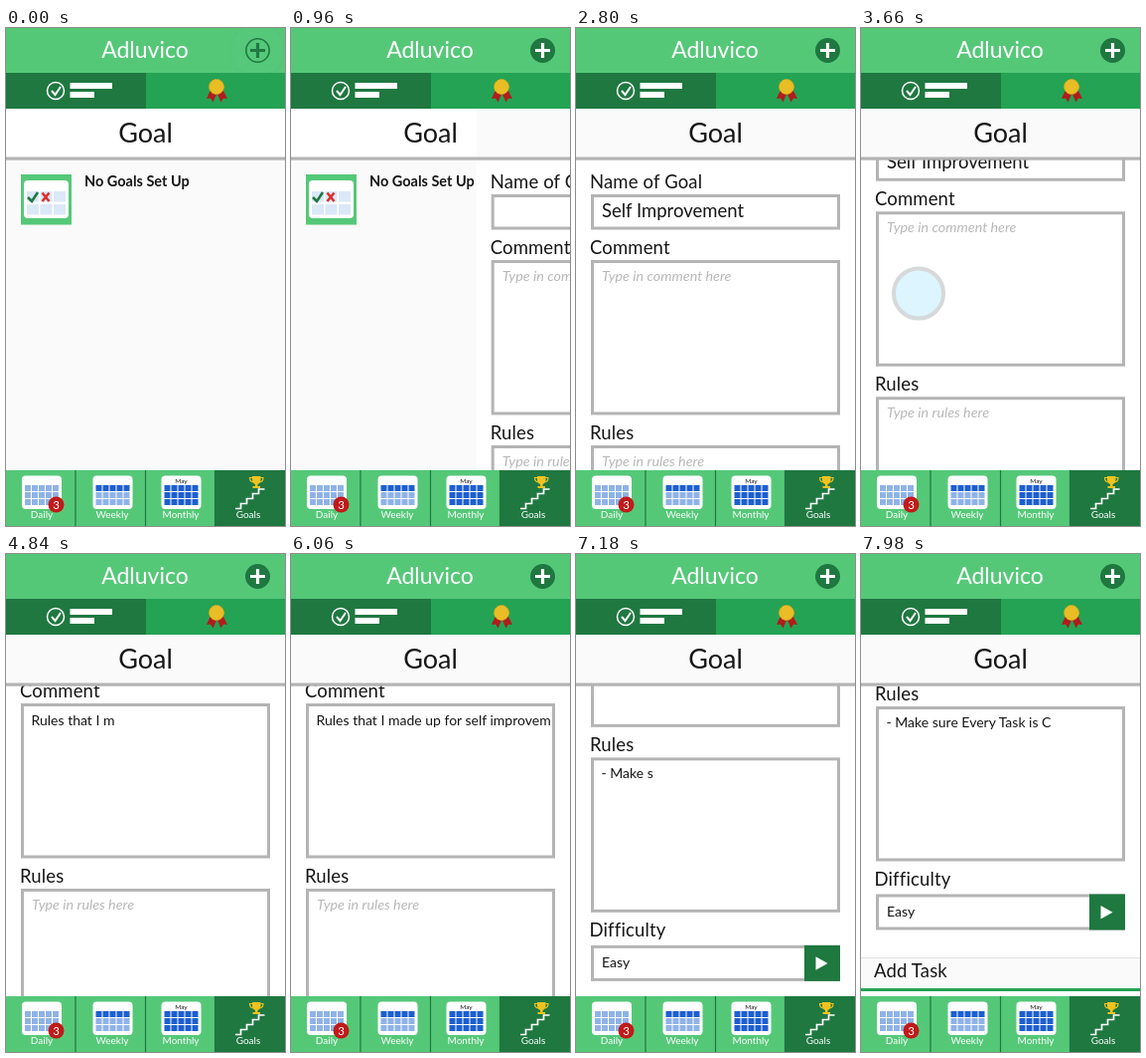
An HTML page that plays this animation: 281 by 500 pixels, repeating every 8000 ms.

```html
<!DOCTYPE html>
<html lang="en">
<head>
<meta charset="utf-8">
<title>Goal setup</title>
<style>
  html, body { margin: 0; width: 100%; height: 100%; overflow: hidden; background: #fafafa; }
  svg { display: block; width: 100vw; height: 100vh; }
  text { font-family: Lato, "Open Sans", sans-serif; fill: #161616; white-space: pre; }
  .label { font-size: 18.5px; letter-spacing: .15px; }
  .body { font-size: 14px; }
  .hint { font-size: 14.3px; font-style: italic; fill: #b8b8b8; }
  .tab { font-size: 10px; fill: #fff; text-anchor: middle; }
  .field { fill: #fff; stroke: #b4b4b4; stroke-width: 3; }
</style>
</head>
<body>
<svg viewBox="0 0 281 500" preserveAspectRatio="none">
  <rect width="281" height="500" fill="#fafafa"/>

  <g id="empty">
    <rect x="15" y="147" width="51" height="50.500" fill="#55c878"/>
    <rect x="18" y="153" width="45" height="38" rx="4" fill="#fff"/>
    <g id="goalCells"></g>
    <path d="M22 170l4 4 6-9" fill="none" stroke="#1f7840" stroke-width="2.600"/>
    <path d="M36.500 165.500l7 8.500m0-8.500l-7 8.500" stroke="#d8322e" stroke-width="2.600"/>
    <text x="79" y="159" font-size="14.500" font-weight="700">No Goals Set Up</text>
  </g>

  <g id="form">
    <rect y="81" width="281" height="720" fill="#fff"/>
    <text class="label" x="14" y="161">Name of Goal</text>
    <rect class="field" x="16.500" y="168.500" width="248" height="32.500"/>
    <text id="name" x="26" y="190" font-size="18.500"></text>

    <text class="label" x="14" y="226.500">Comment</text>
    <rect class="field" x="16.500" y="234.500" width="248" height="152.500"/>
    <text id="commentHint" class="hint" x="26" y="254">Type in comment here</text>
    <text id="comment1" class="body" x="25.500" y="254.500"></text>
    <text id="comment2" class="body" x="25.500" y="270.500"></text>

    <text class="label" x="14" y="412.500">Rules</text>
    <rect class="field" x="16.500" y="420.500" width="248" height="152.500"/>
    <text id="rulesHint" class="hint" x="26" y="440">Type in rules here</text>
    <text id="rules" class="body" x="25.500" y="439.500"></text>

    <text class="label" x="13.500" y="598.500">Difficulty</text>
    <rect class="field" x="16.500" y="609" width="248" height="33"/>
    <text class="body" x="26" y="629.500">Easy</text>
    <rect x="230" y="607.500" width="36" height="36" fill="#1f7840"/>
    <path d="M241.500 619v13.500l12-6.750z" fill="#fff"/>

    <rect y="671.500" width="281" height="31" fill="#fafafa"/>
    <rect y="671" width="281" height="1" fill="#e4e4e4"/>
    <text class="label" x="13" y="690.500">Add Task</text>
    <rect y="702" width="281" height="3" fill="#24a354"/>
  </g>

  <rect y="81" width="281" height="50" fill="#fff"/>
  <rect id="headTint" y="81" width="281" height="50" fill="#fafafa"/>
  <rect y="129.500" width="281" height="3.200" fill="#b4b4b4"/>
  <text x="140.500" y="114.500" font-size="27" text-anchor="middle">Goal</text>

  <rect width="281" height="45" fill="#55c878"/>
  <text x="140" y="30" font-size="23" text-anchor="middle" style="fill:#fff">Adluvico</text>
  <circle id="plusDisc" cx="253.500" cy="22.500" r="11.700" stroke="#1f7840" stroke-width="1.600"/>
  <path id="plus" d="M246 22.500h15M253.500 15v15" stroke-width="3.200"/>

  <rect y="45" width="141" height="36" fill="#1f7840"/>
  <rect x="141" y="45" width="140" height="36" fill="#24a354"/>
  <g fill="none" stroke="#fff">
    <circle cx="50" cy="63" r="8.500" stroke-width="1.500"/>
    <path d="M46 63l3.500 4 5.500-8" stroke-width="2"/>
  </g>
  <path d="M64.500 55h42.500v6h-42.500zM64.500 64h24.500v6h-24.500z" fill="#fff"/>
  <path d="M206 62l-4 9 4-.5 2.500 4 4-9 4 9 2.500-4 4 .5-4.500-9z" fill="#b01c1c"/>
  <circle cx="212" cy="59" r="7.500" fill="#e9bd25" stroke="#d9a51c" stroke-width="1" stroke-dasharray="2 1"/>

  <rect y="444" width="281" height="56" fill="#55c878"/>
  <rect x="211" y="444" width="70" height="56" fill="#1f7840"/>
  <path d="M70 444v56M140.500 444v56M210.500 444v56" stroke="#1f7840" stroke-width="1.200"/>
  <g id="calendars"></g>
  <text x="176.500" y="456.500" font-size="6.500" text-anchor="middle">May</text>
  <text class="tab" x="36" y="492">Daily</text>
  <text class="tab" x="107" y="492">Weekly</text>
  <text class="tab" x="176" y="492">Monthly</text>
  <text class="tab" x="244" y="492">Goals</text>
  <circle cx="50.500" cy="478.500" r="8" fill="#c01a1a"/>
  <text x="50.500" y="482.500" font-size="11.500" text-anchor="middle" style="fill:#fff">3</text>
  <path d="M231 482.500h5.500v-5h6v-5h6v-5h6v-4.500h6" fill="none" stroke="#fff" stroke-width="1.700"/>
  <path d="M248 450h8.500v4q-.5 3.500-3 4v2h2.500v2h-7.500v-2h2.500v-2q-2.500-.5-3-4z" fill="#efc31f"/>
  <path d="M248 451.500h-2.500q0 4 3.500 4.500M256.500 451.500h2.500q0 4-3.500 4.500" fill="none" stroke="#efc31f" stroke-width="1.200"/>

  <g id="touch">
    <circle r="14.800" fill="#78d8fd" stroke="#5c6a6e" stroke-width="2.400"/>
  </g>
</svg>
<script>
const LOOP = 8000;
const $ = id => document.getElementById(id);
const clamp = v => Math.min(1, Math.max(0, v));
const ramp = (t, a, b) => clamp((t - a) / (b - a));
const mix = (a, b, p) => a + (b - a) * p;
const ease = p => p < .5 ? 4 * p ** 3 : 1 - 4 * (1 - p) ** 3;
const set = (id, attrs) => {
  for (const k in attrs) $(id).setAttribute(k, attrs[k]);
};

const box = (x, y, w, h, fill, rx = 0) =>
  `<rect x="${x}" y="${y}" width="${w}" height="${h}" rx="${rx}" fill="${fill}"/>`;

function grid(x, y, cols, rows, dx, dy, w, h, color) {
  let out = '';
  for (let r = 0; r < rows; r++)
    for (let c = 0; c < cols; c++) out += box(x + c * dx, y + r * dy, w, h, color(r));
  return out;
}

const PALE = '#8fb3e8', DEEP = '#1c5fd0';
const calendar = (x, color) =>
  box(x, 449.5, 40, 33.5, '#fff', 4) + grid(x + 3, 459, 5, 3, 7, 7, 6, 6, color);

$('goalCells').innerHTML = grid(21, 164, 3, 2, 13.5, 13, 12, 10.5, () => '#dbe8f7');
$('calendars').innerHTML =
  calendar(16, () => PALE) +
  calendar(87.5, r => r ? PALE : DEEP) +
  calendar(156.5, () => DEEP);

const NAME = 'Self Improvement';
const COMMENT = 'Rules that I made up for self improvement.';
const RULES = '- Make sure Every Task is C';
const WRAP_AT = 30, LINE_MAX = 38;

// First letter appears at `start`, then one more every `step` ms.
const typed = (text, t, start, step) =>
  text.slice(0, Math.max(0, Math.floor((t - start) / step) + 1));

const TAPS = [
  { at: 0, x: 253.5, y: 22.5 },
  { at: 1660, x: 36, y: 186 },
  { at: 3300, x: 58, y: 266.5 },
  { at: 6640, x: 65, y: 365 }
];

function drawTouch(t) {
  const tap = TAPS.find(p => t >= p.at && t < p.at + 410);
  if (!tap) return set('touch', { opacity: 0 });
  const age = t - tap.at;
  const press = ramp(age, 0, 120), release = ramp(age, 212, 410);
  const scale = mix(1.87, 1, press) + release * .92;
  set('touch', {
    opacity: press * (1 - release),
    transform: `translate(${tap.x} ${tap.y}) scale(${scale})`
  });
}

function draw(t) {
  const slide = 281 * (1 - ease(ramp(t, 440, 1630)));
  const scroll = 83 * ease(ramp(t, 3481, 3820)) + 183 * ease(ramp(t, 6812, 7440));
  set('form', { transform: `translate(${slide} ${-scroll})` });
  set('headTint', { x: slide });

  const on = ramp(t, 140, 260);
  set('plusDisc', { fill: `rgba(31,120,64,${on})` });
  set('plus', { stroke: `rgb(${mix(31, 255, on)},${mix(120, 255, on)},${mix(64, 255, on)})` });

  $('name').textContent = typed(NAME, t, 2045, 50);
  const comment = typed(COMMENT, t, 4190, 50);
  const wrapped = comment.length > LINE_MAX;
  $('comment1').textContent = wrapped ? comment.slice(0, WRAP_AT) : comment;
  $('comment2').textContent = wrapped ? comment.slice(WRAP_AT) : '';
  $('rules').textContent = typed(RULES, t, 6862, 43);
  set('commentHint', { opacity: 1 - ramp(t, 4130, 4185) });
  set('rulesHint', { opacity: 1 - ramp(t, 6800, 6855) });

  drawTouch(t);
}

const began = performance.now();
function tick() {
  draw((performance.now() - began) % LOOP);
  requestAnimationFrame(tick);
}
draw(0);
requestAnimationFrame(tick);
</script>
</body>
</html>
```
